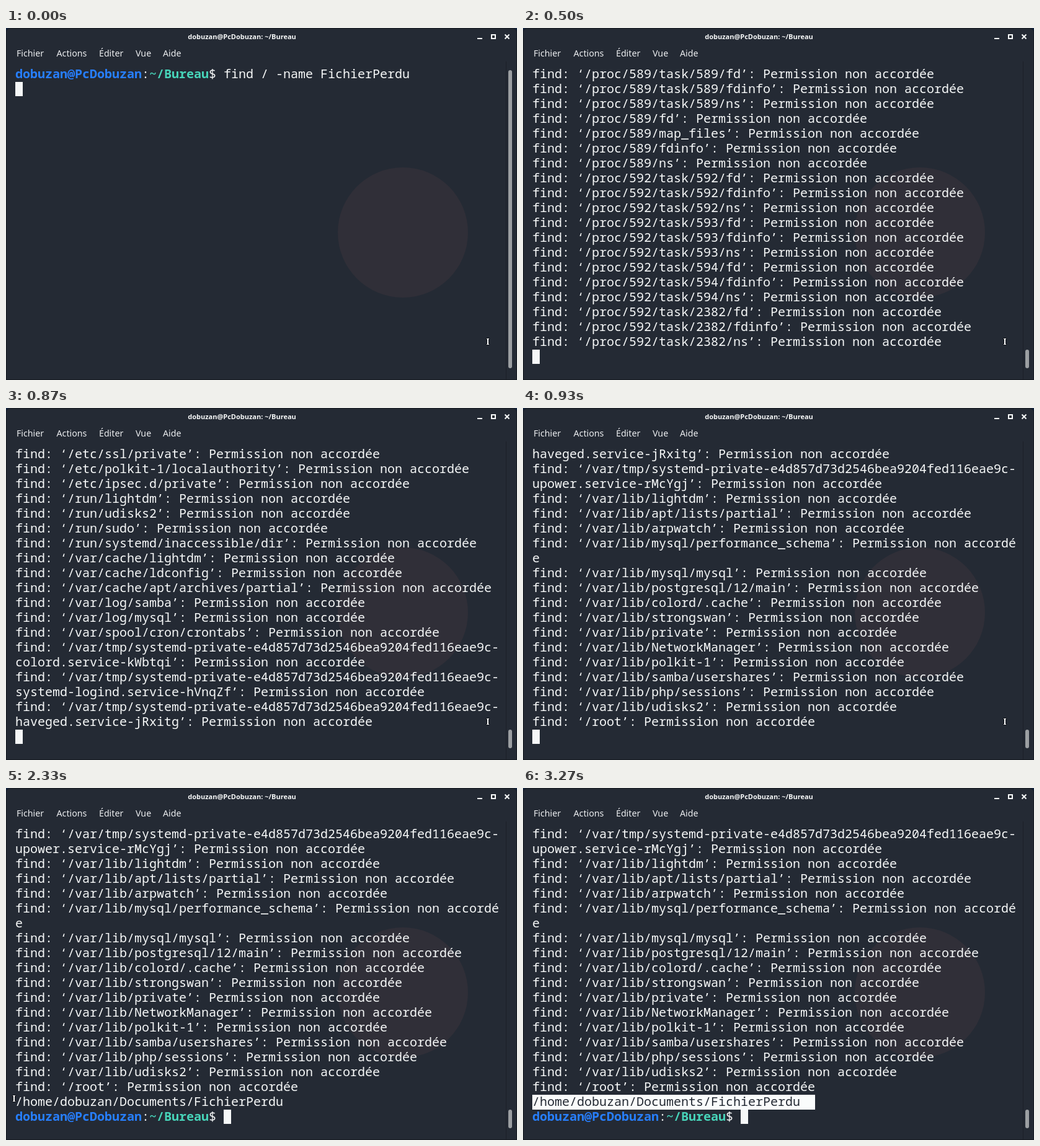
Recreate the animation shown at these times as an HTML page with a canvas. Size 824 by 568 pixels, loop 4360 ms.

```html
<!DOCTYPE html>
<html lang="fr">
<head>
<meta charset="utf-8">
<title>Terminal</title>
<style>
  html, body { margin: 0; width: 100%; height: 100%; overflow: hidden; background: #242a34; }
  canvas { display: block; }
</style>
</head>
<body>
<canvas id="stage" width="824" height="568"></canvas>
<script>
const ctx = document.getElementById('stage').getContext('2d');
const LOOP = 4360;
const BG = '#242a34', FG = '#f6f8f8', EDGE = '#151920';
const MONO = '20px "Noto Sans Mono", "DejaVu Sans Mono", monospace';
const SANS = '"Noto Sans", "Open Sans", sans-serif';
const LEFT = 15, TOP = 63, COL = 12, ROW = 24, COLS = 65, VISIBLE = 20;

const USER = 'dobuzan', HOST = 'PcDobuzan', DIR = '~/Bureau';
const PROMPT = `${USER}@${HOST}:${DIR}$ `;

// Terminal output, wrapped to the window width
const rows = [];
const emit = text => {
  for (let i = 0; i < text.length; i += COLS) rows.push(text.slice(i, i + COLS));
  return rows.length;
};
const deny = path => emit(`find: ‘${path}’: Permission non accordée`);
const denyAll = (base, names) => names.split(' ').forEach(name => deny(base + name));
const tasks = (pid, ids) => ids.forEach(id => denyAll(`/proc/${pid}/task/${id}/`, 'fd fdinfo ns'));
const files = pid => denyAll(`/proc/${pid}/`, 'fd map_files fdinfo ns');
const proc = pid => { tasks(pid, [pid]); files(pid); };
const tmpUnit = unit =>
  deny(`/var/tmp/systemd-private-e4d857d73d2546bea9204fed116eae9c-${unit}`);

const typed = emit(PROMPT + 'find / -name FichierPerdu');
for (let i = 0; i < 58; i++) proc(1 + i * 10);
proc(589);
tasks(592, [592, 593, 594, 2382]);
const burst1 = rows.length;
files(592);
for (let pid = 604; pid < 2430; pid += 38) proc(pid);
proc(2434);
proc(2454);
denyAll('/', '.cache boot/lost+found');
denyAll('/opt/nessus/var/nessus/', 'backups templates users/noone www tmp CA audits');
const burst2 = rows.length;
denyAll('/opt/nessus/var/nessus/', 'logs jobs');
denyAll('/etc/', 'ssl/private polkit-1/localauthority ipsec.d/private');
denyAll('/run/', 'lightdm udisks2 sudo systemd/inaccessible/dir');
denyAll('/var/', 'cache/lightdm cache/ldconfig cache/apt/archives/partial log/samba log/mysql spool/cron/crontabs');
['colord.service-kWbtqi', 'systemd-logind.service-hVnqZf', 'haveged.service-jRxitg',
  'upower.service-rMcYgj'].forEach(tmpUnit);
const burst3 = rows.length - 2;
denyAll('/var/lib/', 'lightdm apt/lists/partial arpwatch mysql/performance_schema mysql/mysql ' +
  'postgresql/12/main colord/.cache strongswan private NetworkManager polkit-1 ' +
  'samba/usershares php/sessions udisks2');
const denied = deny('/root');
const found = emit(`/home/${USER}/Documents/FichierPerdu`);

const mix = (a, b, p) => a + (b - a) * p;
const ease = p => p * p * (3 - 2 * p);

// Progress from 0 to 1 that advances in n discrete updates
const steps = (t, from, to, n) => {
  const k = Math.floor((t - from) / (to - from) * (n - 1) + 1e-6);
  return Math.max(0, Math.min(1, k / (n - 1)));
};

const shownAt = t =>
  t < 430 ? typed :
  t < 500 ? 85 :
  t < 570 ? burst1 :
  t < 620 ? Math.round(mix(burst1, burst2, 0.35)) :
  t < 670 ? Math.round(mix(burst1, burst2, 0.7)) :
  t < 870 ? burst2 :
  t < 930 ? burst3 :
  t < 970 ? denied : found;

function mouseAt(t) {
  if (t >= 3270) return null;
  if (t >= 3130) {
    const p = ease(steps(t, 3130, 3270, 5));
    return [mix(459, 412, p), mix(508, 552, p)];
  }
  if (t >= 2330) {
    const p = ease(steps(t, 2330, 2830, 16));
    return [mix(13, 459, p), mix(500, 508, p)];
  }
  if (t >= 2070) {
    const p = steps(t, 2030, 2170, 4);
    return [mix(16, 13, p), mix(508, 500, p)];
  }
  if (t >= 1570) {
    const p = ease(steps(t, 1570, 1930, 11));
    return [mix(37, 16, p), mix(548, 508, p)];
  }
  const p = ease(steps(t, 970, 1130, 5)), q = 1 - p;
  return [q * q * 777 + 2 * p * q * 390 + p * p * 37,
          q * q * 505 + 2 * p * q * 588 + p * p * 548];
}

function selectedAt(t, mouse) {
  if (t < 2330) return 0;
  if (t >= 2870) return 38;
  return Math.max(0, Math.floor((mouse[0] - LEFT + COL / 2) / COL));
}

const box = (color, x, y, w, h) => {
  ctx.fillStyle = color;
  ctx.fillRect(x, y, w, h);
};
const label = (text, x, y, font, color = FG) => {
  ctx.font = font;
  ctx.fillStyle = color;
  ctx.fillText(text, x, y);
};
const cells = (text, col, row, color = FG, weight = '') =>
  label(text, LEFT + col * COL, TOP + row * ROW + 18, `${weight} ${MONO}`, color);

function drawWindow() {
  box('#10213c', 0, 0, 824, 568);
  ctx.beginPath();
  ctx.roundRect(0.5, 0.5, 823, 567, [6, 6, 0, 0]);
  ctx.fillStyle = BG;
  ctx.fill();
  ctx.fillStyle = '#302f38';
  ctx.beginPath();
  ctx.arc(640, 330, 105, 0, Math.PI * 2);
  ctx.fill();
  ctx.beginPath();
  ctx.roundRect(0.5, 0.5, 823, 567, [6, 6, 0, 0]);
  ctx.strokeStyle = EDGE;
  ctx.lineWidth = 1;
  ctx.stroke();
  box('#1b2028', 806, 54, 1, 513);

  ctx.textAlign = 'center';
  label(`${USER}@${HOST}: ${DIR}`, 380.5, 18, `bold 11px ${SANS}`);
  ctx.textAlign = 'left';
  [['Fichier', 17], ['Actions', 81.5], ['Éditer', 150], ['Vue', 209], ['Aide', 253]]
    .forEach(([name, x]) => label(name, x, 46, `14.2px ${SANS}`, '#eceef0'));

  box(FG, 760, 16, 8, 2);
  ctx.strokeStyle = FG;
  ctx.lineWidth = 2;
  ctx.strokeRect(783, 11, 6, 6);
  ctx.beginPath();
  ctx.moveTo(804.5, 10.5);
  ctx.lineTo(811.5, 17.5);
  ctx.moveTo(811.5, 10.5);
  ctx.lineTo(804.5, 17.5);
  ctx.stroke();
}

function drawScrollbar(total) {
  const h = Math.max(30, Math.min(481, 481 * VISIBLE / total));
  ctx.fillStyle = '#9c9fa2';
  ctx.beginPath();
  ctx.roundRect(810, 549 - h, 6, h, 3);
  ctx.fill();
}

function drawRow(text, row) {
  if (!text.startsWith(PROMPT)) return cells(text, 0, row);
  const id = `${USER}@${HOST}`;
  cells(id, 0, row, '#277fff', 'bold');
  cells(':', id.length, row);
  cells(DIR, id.length + 1, row, '#47d4b9', 'bold');
  cells('$ ' + text.slice(PROMPT.length), id.length + 1 + DIR.length, row);
}

function drawSelection(text, row, count) {
  if (!count) return;
  const area = [LEFT, TOP + row * ROW, count * COL, ROW];
  box('#fafcfc', ...area);
  ctx.save();
  ctx.beginPath();
  ctx.rect(...area);
  ctx.clip();
  cells(text, 0, row, BG);
  ctx.restore();
}

const BEAM = [[-2, -4, 4, 1], [-1, -4, 2, 9], [-2, 5, 4, 1]];
const BOTTOM_EDGE = [[-1, -3, 1, 5], [-3, 0, 5, 1], [-2, 1, 3, 1], [-4, 4, 9, 1]];

function drawMouse(pos, t) {
  if (!pos) return;
  const [x, y] = pos.map(Math.round);
  const shape = t >= 1130 && t < 1640 ? BOTTOM_EDGE : BEAM;
  shape.forEach(([dx, dy, w, h]) => box('#12161c', x + dx - 1, y + dy - 1, w + 2, h + 2));
  shape.forEach(([dx, dy, w, h]) => box('#ffffff', x + dx, y + dy, w, h));
}

function draw(t) {
  const shown = shownAt(t);
  const tail = shown === found ? PROMPT : '';
  const screen = rows.slice(Math.max(0, shown - VISIBLE + 1), shown);
  const mouse = mouseAt(t);

  drawWindow();
  drawScrollbar(shown + 1);
  screen.forEach(drawRow);
  drawSelection(screen[screen.length - 1], screen.length - 1, selectedAt(t, mouse));
  if (tail) drawRow(tail, screen.length);
  box(FG, LEFT + tail.length * COL, TOP + screen.length * ROW, COL, ROW - 1);
  drawMouse(mouse, t);
}

const start = performance.now();
function tick() {
  draw((performance.now() - start) % LOOP);
  requestAnimationFrame(tick);
}
tick();
</script>
</body>
</html>
```
